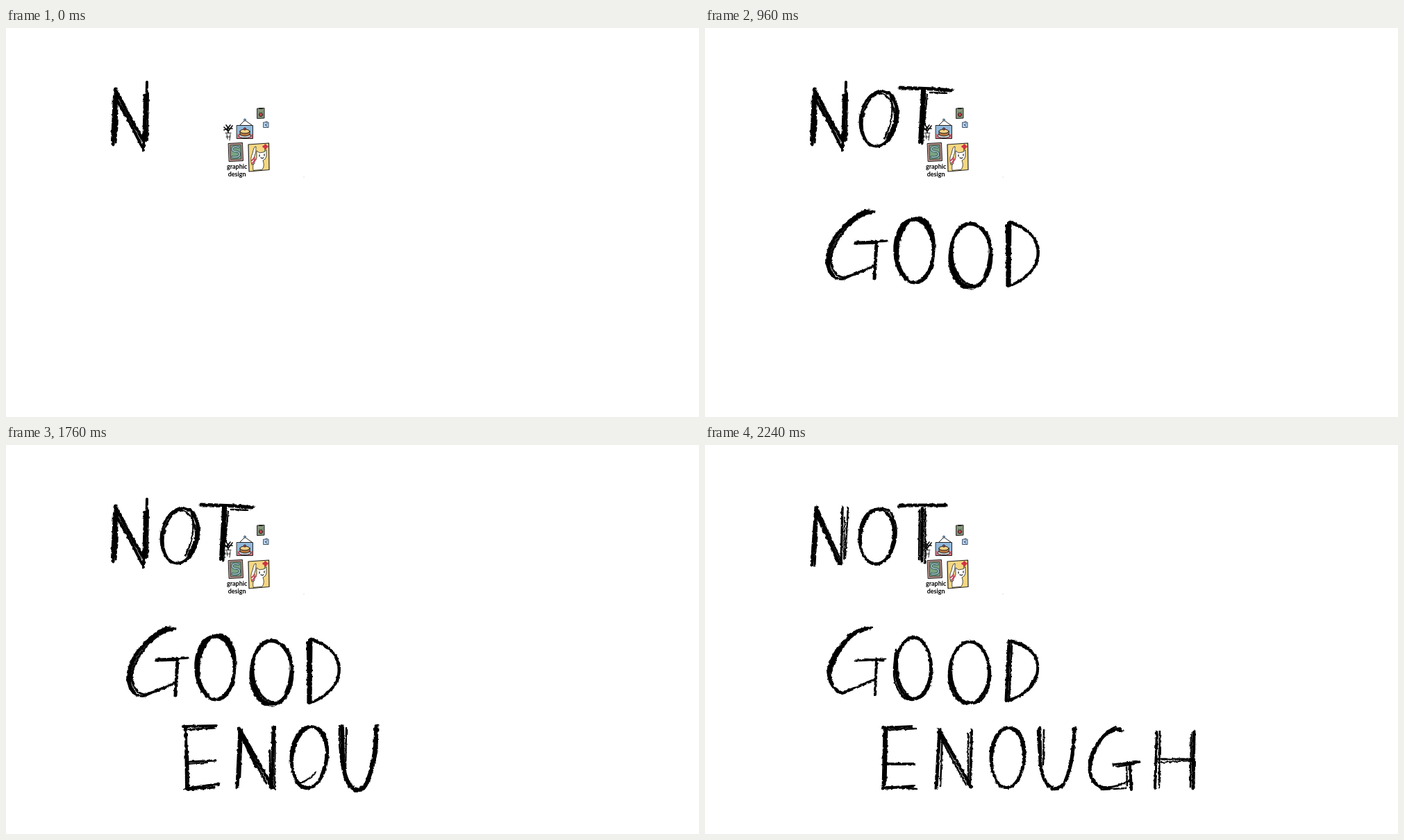
Write an HTML page that moves like this. It is 998 px wide and 561 px high and loops after 2400 ms.

```html
<!DOCTYPE html>
<html lang="en">
<head>
<meta charset="utf-8">
<title>Not good enough</title>
<style>
  html, body { margin: 0; width: 100%; height: 100%; overflow: hidden; background: #fff; }
  svg { display: block; width: 998px; height: 561px; }
  .ink { fill: none; stroke: #000; stroke-linecap: round; stroke-linejoin: round; }
  text { font: bold 9px Lato, "Open Sans", sans-serif; text-anchor: middle; }
</style>
</head>
<body>
<svg viewBox="0 0 998 561">
  <defs>
    <filter id="rough" filterUnits="userSpaceOnUse" x="0" y="0" width="998" height="561" color-interpolation-filters="sRGB">
      <feTurbulence type="fractalNoise" baseFrequency=".22" numOctaves="2" seed="4"/>
      <feDisplacementMap in="SourceGraphic" scale="3.5" xChannelSelector="R" yChannelSelector="G"/>
    </filter>
  </defs>
  <g id="first" class="ink" filter="url(#rough)"></g>
  <g id="second" class="ink" filter="url(#rough)"></g>

  <g stroke="#222" stroke-width="1" stroke-linejoin="round" stroke-linecap="round">
    <!-- small prints -->
    <path d="M362 116L372 115.500 372 130 362 130.500Z" fill="#87967a"/>
    <path d="M365 116h4" stroke-width="2"/>
    <circle cx="367" cy="125" r="2.600" fill="#c8434b"/>
    <path d="M365 121l2 2 2-2" fill="none" stroke="#345f3f"/>
    <path d="M371 136h7v7.500h-7z" fill="#b9d6f2" stroke="#41536b"/>
    <path d="M374 135h2M373 139l3 3M376 138l-2 2" stroke="#34465c"/>
    <!-- hanging cake -->
    <path d="M337 140L344 133 354 140" fill="none"/>
    <circle cx="344" cy="132.500" r="1.500" fill="#6aa5d8" stroke="#456"/>
    <path d="M332.500 140.500h23v19h-23z" fill="#91b9dc"/>
    <path d="M333 153h22v6h-22z" fill="#d9707b" stroke="none"/>
    <ellipse cx="344" cy="155.500" rx="9" ry="3" fill="#dfe5ee"/>
    <path d="M337 149v5q7 4 14 0v-5z" fill="#b9763f"/>
    <ellipse cx="344" cy="149" rx="7" ry="3" fill="#f1cf83"/>
    <circle cx="344" cy="145.500" r="1.600" fill="#d34450"/>
    <!-- wall plant -->
    <path d="M320 151L319 143M320 149L314 143M320 149L326 141M314 147L319 145 326 145M317 140l3 4 3-4" fill="none" stroke="#111" stroke-width="1.700"/>
    <path d="M316 151.500h8M318 153l1 7M323 153l-1 9M317 157h6" fill="none"/>
    <!-- framed snake -->
    <path d="M320.500 166.500L340.500 165.500 341.500 191.500 321.500 192.500Z" fill="#b78e88"/>
    <path d="M323.500 169L338 168.500 338.500 189 324 189.500Z" fill="#79a485" stroke-width=".7"/>
    <path d="M335 172C324 169 323 178 331 178S339 188 326 186" fill="none" stroke="#263e45" stroke-width="3"/>
    <path d="M335 172C324 169 323 178 331 178S339 188 326 186" fill="none" stroke="#a9cbd1" stroke-width="1.500"/>
    <!-- cat portrait -->
    <path d="M349 168L378.500 166 379 204.500 350 207Z" fill="#f5d782" stroke-width="1.200"/>
    <path d="M356 205C354 195 360 191 361 187L361 177 365 180 371 179 375 176 375 185Q374 190 370 191Q373 199 369 204Z" fill="#fff" stroke-width=".8"/>
    <path d="M354 197Q351 188 355 181Q357 170 360 171Q361 179 357 187L358 195Z" fill="#fff" stroke-width=".8"/>
    <path d="M365 183v2M372 182v2M367 187l2 1 2-1" fill="none" stroke-width="1.300"/>
    <path d="M354 191l4-4M355 195l5-6" stroke="#c94961" stroke-width="2"/>
    <path d="M371 171h5M373.500 169v5" stroke="#cf3344" stroke-width="3.500"/>
    <path d="M373 175l-1 4" stroke="#49704d"/>
  </g>
  <text x="332.700" y="203">graphic</text>
  <text x="332.700" y="214">design</text>
  <path d="M428.500 215h1" stroke="#bbb"/>
</svg>
<script>
// Each letter is a list of strokes: pen width, then a path or an oval "O cx cy rx ry tilt".
const firstPose = [
  ["5 M158 88L157 125 154 168", "3 M161 92L158 165", "2 M155 98L152 163", "5 M158 89L175 122 198 163",
   "4 M160 104L180 140 198 175", "4 M203 78L202 125 201 162", "4 M200 97L198 176", "2 M205 95L204 162"],
  ["3.5 O250 131 26 40 8", "3 O252 131 25 40 12", "2.5 O248 132 25 38 5", "2.5 M266 95Q276 125 258 160", "3 M271 97Q282 128 262 158"],
  ["5 M281 86L330 88 355 90", "3 M283 88L357 89", "2.5 M325 93L348 94", "5 M316 92L312 166", "4 M313 90L309 165", "2 M320 95L316 140"],
  ["5 M243 265Q214 268 193 295C176 318 172 345 185 357", "3 M236 262C205 270 172 310 175 340Q180 364 199 362L246 342",
   "3 M241 265C205 275 180 315 181 338Q185 358 200 360L230 350", "5 M218 310L248 309", "3 M216 311L262 307", "5 M247 309L244 361"],
  ["4 O302 321 27 46 2", "3.5 O301 322 28 46 -3", "3 O304 320 26 47 6", "3 M310 274Q333 285 328 330", "3 M276 310Q275 345 292 362"],
  ["5 O383 328 29 46 -1", "3 O382 329 30 46 4", "3 O384 327 28 44 -5", "3 M406 295Q416 325 402 358"],
  ["7 M438 282L437 371", "2.5 M434 284L435 373", "4 M437 281Q460 285 474 303Q485 325 474 345Q462 363 438 372",
   "2.5 M440 279Q470 290 480 315Q484 340 462 360L437 374"],
  ["4 M259 407L260 496", "2.5 M257 406L262 450 263 494", "4 M255 406L303 405", "3 M257 411L300 408",
   "3 M262 457L302 455", "2 M262 460L290 458", "4 M258 496L306 489", "3 M262 497L300 494"],
  ["5 M337 410L333 494", "2.5 M340 410L337 480", "5 M336 409L362 455 384 494", "3 M338 418L375 488",
   "2.5 M334 410L360 465", "5 M385 407L383 495", "2.5 M380 440L380 494", "2 M388 406L387 497"],
  ["4 O437 450 25 44 5", "3 O438 451 25 45 9", "3 O436 450 26 44 2", "2.5 M422 488Q436 484 446 472", "3 M458 415Q467 445 453 478"],
  ["6 M484 406L485 460Q490 494 505 497", "2.5 M480 405Q478 470 498 495", "2.5 M490 408L489 465",
   "6 M533 406Q533 460 518 490Q513 499 503 498", "3 M535 404L534 440Q528 480 510 498"],
  ["5 M605 409Q582 405 565 437C548 470 558 497 585 497", "3 M608 412Q585 408 570 435Q550 475 565 490Q580 500 615 485",
   "3 M600 406Q570 415 556 455Q553 480 572 495L600 497", "5 M584 460L622 462", "3 M582 459L637 458",
   "5 M612 462L610 498", "2.5 M616 460L616 500", "2 M628 460L612 490"],
  ["5 M651 406L653 498", "2 M656 410L656 495", "3 M653 458L702 456", "2 M655 461L700 459",
   "6 M702 405L703 500", "3 M707 410L708 495", "2.5 M699 404L701 507", "2 M705 404L712 492"]
];
const secondPose = [
  ["5 M160 90L154 172", "3 M162 92L158 174", "5 M161 91L176 132 193 171", "3 M164 96L197 170",
   "2.5 M161 102L186 158", "3.5 M198 90L196 172", "2.5 M206 90L202 162", "2 M201 105L200 165"],
  ["3.5 O248 132 25 39 5", "3 O247 132 25 40 2", "2.5 O250 132 25 41 9", "2.5 M269 98Q278 130 260 168"],
  ["5 M281 87L347 87", "3 M279 89L325 86", "5 M313 92L312 167", "2.5 M309 94L308 165", "3 M317 92L317 170"],
  ["2.5 M241 263Q225 262 205 275", "6 M213 273Q191 292 180 325", "4 M238 264Q190 275 177 325Q179 352 198 358L245 338",
   "2.5 M182 318Q175 350 200 358", "3 M217 311L260 309", "3 M230 309L257 311", "4 M247 309L245 360"],
  ["4 O300 322 25 44 1", "2.5 O299 323 27 45 3", "2.5 O302 321 25 45 -3", "2.5 M275 295Q269 325 281 350"],
  ["4 O381 328 28 44 0", "2.5 O380 328 29 45 5", "2.5 O383 328 28 45 -4"],
  ["5 M438 283L434 368", "3 M442 284L438 368", "4 M438 282Q464 286 476 305Q484 325 472 346Q458 363 434 369",
   "2.5 M444 285Q476 295 480 318Q478 340 455 361"],
  ["5 M259 408L257 495", "3 M262 408L260 490", "4 M256 408L298 406", "2.5 M262 411L304 409",
   "4 M261 460L301 460", "4 M256 495L300 492", "2.5 M262 493L305 496"],
  ["5 M338 410L333 495", "2.5 M342 414L339 492", "5 M337 411L362 455 383 493", "2.5 M335 414L376 490",
   "4 M384 411L382 493", "2.5 M379 416L379 490"],
  ["4 O436 451 23 43 3", "3 O435 451 24 43 0", "2.5 O437 451 24 44 6"],
  ["5 M482 409L483 460Q487 491 502 495", "2.5 M479 411Q480 475 497 494", "2.5 M488 410L487 460",
   "5 M532 408Q530 465 517 488Q512 496 500 496", "2.5 M534 407L530 450Q525 482 508 496"],
  ["4 M598 409Q577 410 562 437C545 470 555 494 582 495", "3 M601 413Q580 405 565 435Q546 475 563 490Q580 500 612 484",
   "2.5 M592 406Q565 418 553 455Q552 480 572 497L606 495", "3.5 M588 461L626 457", "2.5 M592 464L618 460",
   "4 M612 462L614 497", "2.5 M607 464L608 492"],
  ["4 M651 413L648 495", "2.5 M655 413L654 494", "3 M651 453L704 453", "2 M653 458L702 455",
   "5 M704 414L703 495", "2.5 M700 418L699 493"]
];
const PERIOD = 2400, STEP = 160, REDRAW = 2240;
const shownAt = firstPose.map((_, i) => (i < 7 ? i : i + 1) * STEP);

function oval(spec) {
  const [cx, cy, rx, ry, tilt] = spec.split(" ").map(Number);
  const a = tilt * Math.PI / 180, dx = rx * Math.cos(a), dy = rx * Math.sin(a);
  const arc = s => `A${rx} ${ry} ${tilt} 0 1 ${cx + s * dx} ${cy + s * dy}`;
  return `M${cx - dx} ${cy - dy}${arc(1)}${arc(-1)}`;
}

function strokeMarkup(stroke) {
  const gap = stroke.indexOf(" "), spec = stroke.slice(gap + 1);
  const d = spec[0] === "O" ? oval(spec.slice(1)) : spec;
  return `<path stroke-width="${stroke.slice(0, gap)}" d="${d}"/>`;
}

function build(id, pose) {
  const group = document.getElementById(id);
  group.innerHTML = pose.map(letter => `<g>${letter.map(strokeMarkup).join("")}</g>`).join("");
  return group;
}

const first = build("first", firstPose), second = build("second", secondPose);
const show = (el, on) => el.setAttribute("display", on ? "inline" : "none");
const start = performance.now();

function draw(now) {
  const t = Math.max(0, now - start) % PERIOD;
  show(first, t < REDRAW);
  show(second, t >= REDRAW);
  shownAt.forEach((time, i) => show(first.children[i], t >= time));
  requestAnimationFrame(draw);
}
draw(start);
</script>
</body>
</html>
```
